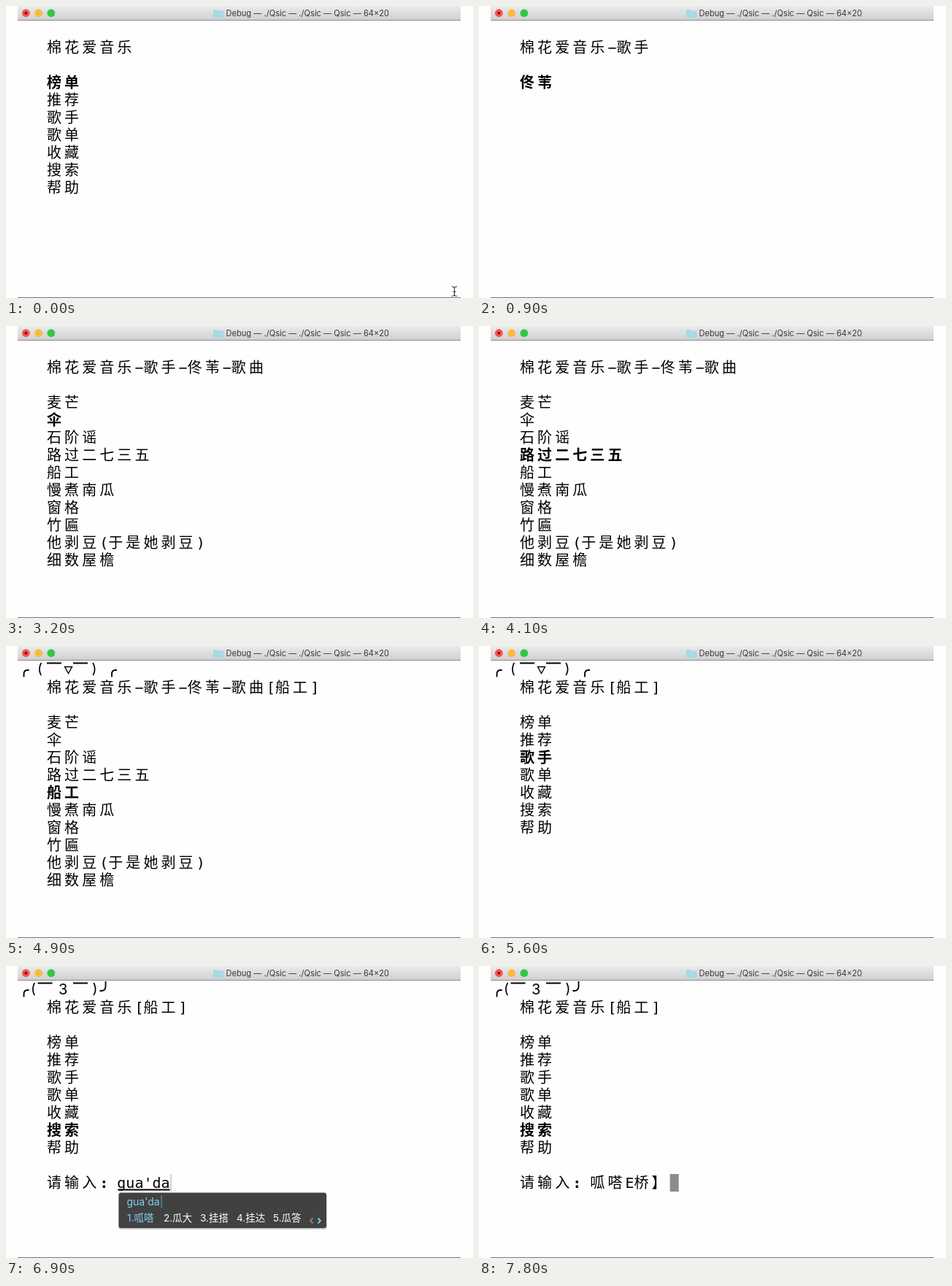
Recreate the animation shown at these times as an HTML page. Size 640 by 400 pixels, loop 8 s.

```html
<!DOCTYPE html>
<html lang="zh-CN">
<head>
<meta charset="utf-8">
<title>Terminal music player</title>
<style>
  html, body { margin: 0; width: 100%; height: 100%; overflow: hidden; background: #fefefe; }
  svg { display: block; width: 640px; height: 400px; }
  text { white-space: pre; }
  .term { font: 500 20px "DejaVu Sans Mono", "Noto Sans CJK SC", "Noto Sans CJK", monospace; }
  .bold { font-weight: 700; }
  .ui { font-family: Inter, "Noto Sans CJK SC", "Noto Sans CJK", sans-serif; font-weight: 400; }
</style>
</head>
<body>
<svg viewBox="0 0 640 400">
  <defs>
    <linearGradient id="bar" x2="0" y2="1">
      <stop offset="0" stop-color="#ebebeb"/>
      <stop offset="1" stop-color="#d0d0d0"/>
    </linearGradient>
  </defs>
  <rect width="640" height="400" fill="#fefefe"/>
  <rect x="16" width="607" height="19" fill="url(#bar)"/>
  <rect x="16" y="19" width="607" height="1" fill="#8c8c8c"/>
  <rect x="16" y="399" width="607" height="1" fill="#777"/>
  <circle cx="27.3" cy="9.7" r="5.4" fill="#f9504c"/>
  <circle cx="27.3" cy="9.7" r="1.8" fill="#5d0b0b"/>
  <circle cx="44.6" cy="9.7" r="5.4" fill="#fdb93c"/>
  <circle cx="61.8" cy="9.7" r="5.4" fill="#32c748"/>
  <path d="M284 6q0-1 1-1h4l1.5 1.5h7q1 0 1 1V15q0 1-1 1h-12.500q-1 0-1-1z" fill="#a9d8e8"/>
  <text class="ui" x="413.3" y="14" font-size="11.1" fill="#383838" text-anchor="middle">Debug — ./Qsic — ./Qsic — Qsic — 64×20</text>
  <g id="screen" class="term"></g>
  <path id="mouse" d="M611 384.500q3.500 0 3.500 2.500v8q0 2.500-3.500 2.500M618 384.500q-3.500 0-3.500 2.500v8q0 2.500 3.500 2.500M612.500 391.500h4" fill="none" stroke="#333" stroke-width="1.1"/>
</svg>
<script>
const LOOP = 8000, LEFT = 56, CELL = 12.04, LINE = 24, FIRST = 64;
const screen = document.getElementById('screen');
const mouse = document.getElementById('mouse');

const app = '棉花爱音乐';
const singer = '佟苇';
const playing = '船工';
const pages = {
  main: { path: [], rows: ['榜单', '推荐', '歌手', '歌单', '收藏', '搜索', '帮助'] },
  singers: { path: ['歌手'], rows: [singer] },
  singer: { path: ['歌手', singer], rows: ['歌曲'] },
  songs1: {
    path: ['歌手', singer, '歌曲'],
    rows: ['缓缓此夜', '青瓦', '我往河边找灯', '至于晚饭', '晾晒', '纸船谱',
      '偶尔迟到的木匠', '浅滩', '山坳', '问井台']
  },
  songs2: {
    path: ['歌手', singer, '歌曲'],
    rows: ['麦芒', '伞', '石阶谣', '路过二七三五', playing, '慢煮南瓜',
      '窗格', '竹匾', '他剥豆(于是她剥豆)', '细数屋檐']
  }
};

// [start ms, page, selected row]
const steps = [
  [0, 'main', 0], [200, 'main', 1], [400, 'main', 2],
  [700, 'singers', 0], [1400, 'singer', 0], [1600, 'songs1', 0],
  [2300, 'songs2', 0], [3000, 'songs2', 1], [3400, 'songs2', 2],
  [3700, 'songs2', 3], [4300, 'songs2', 4],
  [5100, 'singer', 0], [5300, 'singers', 0], [5500, 'main', 2],
  [5700, 'main', 3], [5900, 'main', 4], [6100, 'main', 5]
];

// [start ms, committed text, text being composed, candidates]
const entries = [
  [6300, '', '', ''],
  [6700, '', 'gua', '瓜 刮 挂 呱 寡'],
  [6900, '', "gua'da", '呱嗒 瓜大 挂搭 挂达 瓜答'],
  [7100, '呱嗒', '', ''],
  [7300, '呱嗒E', '', ''],
  [7400, '呱嗒E', 'qiao', '桥 巧 敲 瞧 悄'],
  [7500, '呱嗒E桥', '', ''],
  [7700, '呱嗒E桥】', '', '']
];

const at = (list, t) => list.filter(item => item[0] <= t).pop();
const cells = s => [...s].reduce((n, c) => n + (c > '\u2fff' ? 2 : 1), 0);

// Wide characters take two terminal cells.
function term(s, x, y, bold) {
  let column = 0;
  const xs = [...s].map(c => {
    const px = x + column * CELL;
    column += cells(c);
    return px.toFixed(2);
  });
  return `<text x="${xs.join(' ')}" y="${y}"${bold ? ' class="bold"' : ''}>${s}</text>`;
}

const label = (s, x, y, size, fill = '#000') =>
  `<text class="ui" x="${x}" y="${y}" font-size="${size}" fill="${fill}">${s}</text>`;
const rect = (x, y, w, h, fill, extra = '') =>
  `<rect x="${x}" y="${y}" width="${w}" height="${h}" fill="${fill}" ${extra}/>`;
const stroke = (d, color, width) =>
  `<path d="${d}" fill="none" stroke="${color}" stroke-width="${width}"/>`;

function face(winking) {
  const arm = x => `M${x} 42.500v-4q0-5.500 5-5.500h2`;
  const brow = x => `M${x} 23.500h20`;
  return winking
    ? stroke(arm(24.5) + brow(43.5) + brow(92) + 'M136.500 21v7q0 6-6 6h-2', '#000', 1.8) +
      label('(', 34, 38, 19) + label('3', 72, 39, 20) + label(')', 118.5, 38, 19)
    : stroke(arm(24.5) + brow(56) + brow(92) + arm(145), '#000', 1.8) +
      stroke('M80.500 28.500h10l-5 9z', '#000', 1.4) +
      label('(', 43, 38, 19) + label(')', 117.5, 38, 19);
}

function candidatePanel(typed, words) {
  const blue = '#7fd0f0';
  const gap = words[0].length > 1 ? 50 : 36;
  return rect(154, 312, 286, 49, '#000', 'rx="4" opacity=".18"') +
    rect(154.5, 310.5, 284.5, 48.5, '#414141', 'rx="3"') +
    `<text class="ui" x="165.500" y="327.500" font-size="14" fill="${blue}">${typed}<tspan fill="#50a8d8">|</tspan></text>` +
    words.map((w, i) =>
      label(`${i + 1}.${w}`, 166 + i * gap, 350, 13.5, i ? '#fff' : blue)).join('') +
    stroke('M420.500 345.500l-3.500 3.500 3.500 3.500', '#888', 1.8) +
    stroke('M427.500 345.500l3.500 3.500-3.500 3.500', blue, 1.8);
}

function prompt(t) {
  const [, text, typed, words] = at(entries, t);
  const y = FIRST + 10 * LINE;
  const start = LEFT + 8 * CELL;
  const typedX = start + cells(text) * CELL;
  const end = typedX + typed.length * CELL;
  const out = term('请输入', LEFT, y) + term(':', LEFT + 6 * CELL, y, true) + term(text, start, y);
  if (!typed) return out + rect(end + 1, 285, CELL, 24, '#8b8b8b');
  return out + term(typed, typedX, y) +
    rect(typedX + 1, 305.5, end - typedX - 1, 2, '#000') +
    rect(end + 1, 285, 1, 24, '#aaa') +
    candidatePanel(typed, words.split(' '));
}

function draw(t) {
  const [, name, selected] = at(steps, t);
  const { path, rows } = pages[name];
  const isPlaying = t >= 4800;
  const heading = [app, ...path].join('−') + (isPlaying ? `[${playing}]` : '');
  return (isPlaying ? face(t >= 6500) : '') +
    term(heading, LEFT, FIRST) +
    rows.map((row, i) => term(row, LEFT, FIRST + (i + 2) * LINE, i === selected)).join('') +
    (t >= 6300 ? prompt(t) : '');
}

let shown = '';
const origin = performance.now();
function frame() {
  const t = Math.max(0, performance.now() - origin) % LOOP;
  const next = draw(t);
  if (next !== shown) screen.innerHTML = shown = next;
  mouse.style.display = t < 100 ? '' : 'none';
  requestAnimationFrame(frame);
}
frame();
</script>
</body>
</html>
```
